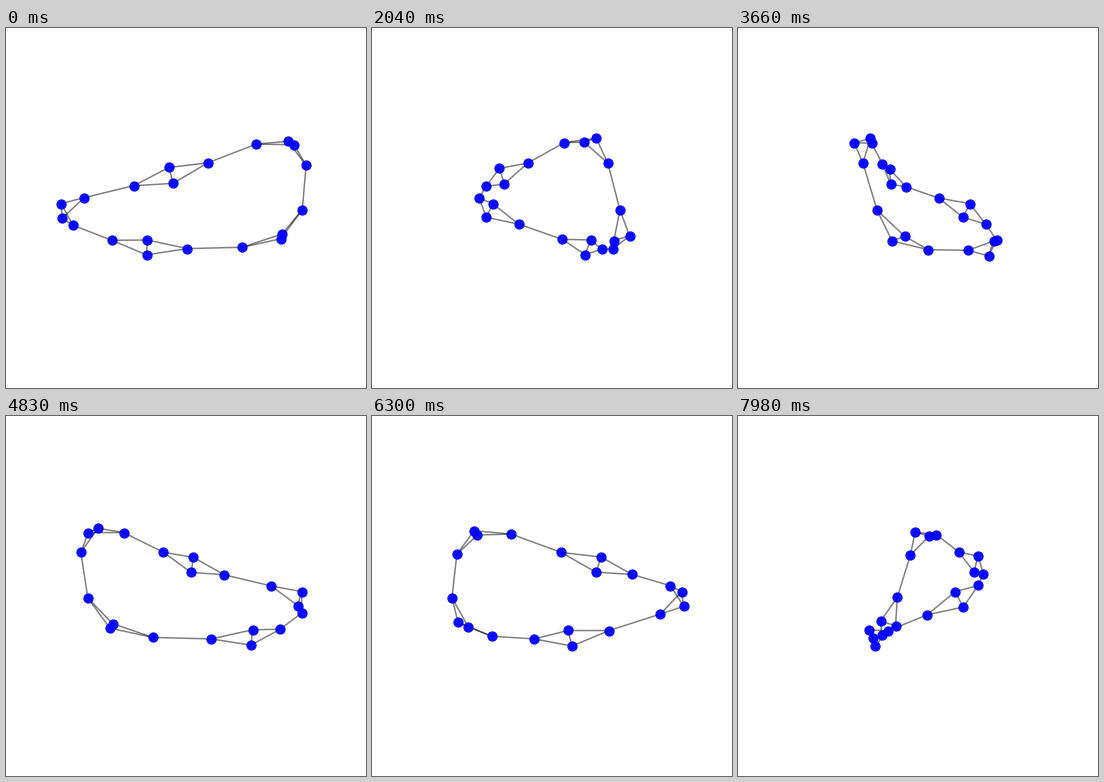
These frames come from a looping animation (360x360 px, 8000 ms). A matplotlib script:

```python
import numpy as np
import matplotlib.pyplot as plt
from matplotlib.animation import FuncAnimation
from matplotlib.collections import LineCollection

SIZE = 360
DPI = 72
FRAMES = 400
INTERVAL = 20
CENTER = SIZE / 2 + 0.0135 * SIZE * np.array([1, -1])
EYE = SIZE * 10 / 1.85      # eye distance in pixels

DIAMONDS = 5
HALF_LENGTH = 21            # tip to middle of a diamond, degrees along the ring
TIP_PULL = 0.955            # tips lie slightly inside the curve
HALF_WIDTH = 8.2

# Closed curve: one row per axis (right, toward viewer, down),
# one column per harmonic
AMPLITUDE = np.array([(121.6, 4.0, 5.2), (51.3, 13.1, 1.7), (51.5, 13.6, 6.0)])
PHASE = np.array([(-102.5, 34.9, 43.3), (2.1, 81.5, -175.3), (146.4, 33.8, -40.1)])
HARMONICS = np.array([1, 2, 3])


def curve(degrees):
    angles = np.radians(HARMONICS * degrees + PHASE)
    return (AMPLITUDE * np.cos(angles)).sum(axis=1)


def diamond(degrees):
    """Tip, two middle nodes, tip; the middle pair stands across the bend."""
    first = TIP_PULL * curve(degrees - HALF_LENGTH)
    middle = curve(degrees)
    last = TIP_PULL * curve(degrees + HALF_LENGTH)
    across = np.cross(middle - first, last - middle)
    across *= HALF_WIDTH / np.linalg.norm(across)
    return [first, middle + across, middle - across, last]


def ring_edges(count):
    edges = []
    for k in range(0, 4 * count, 4):
        edges += [(k, k + 1), (k, k + 2), (k + 1, k + 2),
                  (k + 1, k + 3), (k + 2, k + 3),
                  (k + 3, (k + 4) % (4 * count))]
    return np.array(edges)


def project(degrees):
    a = np.radians(degrees)
    right, near, down = NODES.T
    x = right * np.cos(a) - near * np.sin(a)
    depth = near * np.cos(a) + right * np.sin(a)
    scale = 1 / (1 - depth / EYE)
    return CENTER + np.column_stack([x * scale, down * scale])


NODES = np.concatenate([diamond(k * 360 / DIAMONDS) for k in range(DIAMONDS)])
EDGES = ring_edges(DIAMONDS)

fig = plt.figure(figsize=(SIZE / DPI, SIZE / DPI), dpi=DPI, facecolor="white")
ax = fig.add_axes([0, 0, 1, 1])
ax.set_xlim(0, SIZE)
ax.set_ylim(SIZE, 0)
ax.axis("off")

start = project(0)
lines = LineCollection(start[EDGES], colors="black", alpha=0.5,
                       linewidths=1.5, zorder=1)
ax.add_collection(lines, autolim=False)
dots = ax.scatter(*start.T, s=10.3 ** 2, color="blue", alpha=0.95,
                  linewidths=0, zorder=2)


def update(i):
    # the view turns one degree every 30 ms
    points = project((2 * i + 1) // 3)
    lines.set_segments(points[EDGES])
    dots.set_offsets(points)
    return lines, dots


anim = FuncAnimation(fig, update, frames=FRAMES, interval=INTERVAL,
                     init_func=lambda: update(0), blit=True,
                     repeat=True, repeat_delay=0)
plt.show()
```
